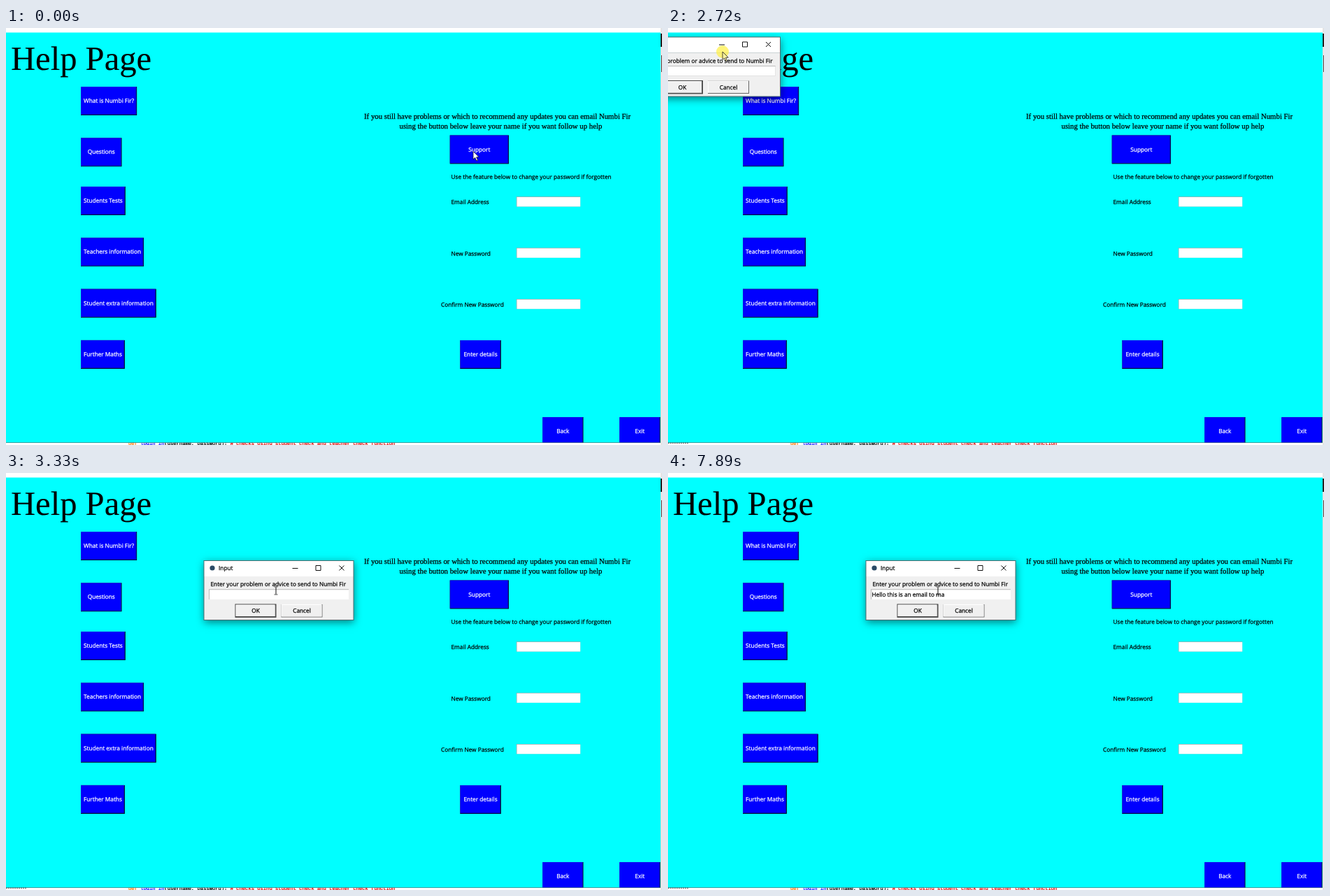
An HTML page with a canvas for the animation above (8 s loop, 938 px wide and 597 px high).

```html
<!DOCTYPE html>
<html lang="en">
<head>
<meta charset="utf-8">
<title>Help Page</title>
<style>
  html, body { margin: 0; width: 100%; height: 100%; overflow: hidden; background: #fff; }
  canvas { display: block; }
</style>
</head>
<body>
<canvas id="stage" width="938" height="597"></canvas>
<script>
const ctx = document.getElementById('stage').getContext('2d');
ctx.textRendering = 'geometricPrecision';
ctx.lineJoin = 'round';

const LOOP = 8000;
const STEP = 80;
const DIALOG_AT = 1930;
const GRAB = 2720, DROP = 3040, IBEAM_AT = 3280;
const TYPING_AT = 3800;
const BRAND = 'Numbi Fir';
const SANS = '8.27px "Open Sans", sans-serif';
const SERIF = '10.79px "Liberation Serif", serif';
const MONO = '7.15px "Liberation Mono", monospace';
const LEFT_LABELS = [`What is ${BRAND}?`, 'Questions', 'Students Tests',
  'Teachers information', 'Student extra information', 'Further Maths'];

// [time, x, y]
const POINTER = [
  [0, 668, 176.5], [480, 652, 171], [800, 732, 182], [960, 701, 177],
  [1200, 686, 178], [1920, 686, 178], [GRAB, 78, 34],
  [2880, 366, 128.5], [DROP, 386, 144], [IBEAM_AT, 386, 168.5]
];
const DIALOG = [[GRAB, -54, 12.5], [2880, 262.5, 109.5], [DROP, 282.5, 125]];

// [word, start, ms per letter]
const WORDS = [
  ['Hello', TYPING_AT, 150], ['this', 4780, 83], ['is', 5330, 80], ['an', 5800, 70],
  ['email', 6270, 130], ['to', 7220, 150], ['ma', 7720, 80]
];

function place(keys, t) {
  const next = keys.findIndex(key => key[0] > t);
  if (next < 0) return keys[keys.length - 1].slice(1);
  if (next === 0) return keys[0].slice(1);
  const [t0, x0, y0] = keys[next - 1], [t1, x1, y1] = keys[next];
  const k = (t - t0) / (t1 - t0);
  return [x0 + (x1 - x0) * k, y0 + (y1 - y0) * k];
}

function typing(t) {
  let typed = '';
  let caret = t < TYPING_AT && (t - 650) % 1000 < 600;
  for (const [word, start, pace] of WORDS) {
    if (t < start) break;
    const count = Math.floor((t - start) / pace) + 1;
    typed += (typed && ' ') + word.slice(0, count);
    caret = count <= word.length;
  }
  return { typed, caret };
}

function box(color, x, y, w, h) {
  ctx.fillStyle = color;
  ctx.fillRect(x, y, w, h);
}

// A hairline outline gives the denser look of screen text.
function text(str, x, y, color = '#000', font = SANS, align = 'left', weight = 0.25) {
  ctx.font = font;
  ctx.fillStyle = ctx.strokeStyle = color;
  ctx.textAlign = align;
  ctx.lineWidth = weight;
  ctx.fillText(str, x, y);
  ctx.strokeText(str, x, y);
}

function path(points, close) {
  ctx.beginPath();
  for (const [x, y] of points) ctx.lineTo(x, y);
  if (close) ctx.closePath();
}

function line(...points) {
  path(points);
  ctx.stroke();
}

function disc(color, x, y, r) {
  ctx.fillStyle = color;
  ctx.beginPath();
  ctx.arc(x, y, r, 0, Math.PI * 2);
  ctx.fill();
}

function blueButton(label, x, y, minWidth = 58.5) {
  ctx.font = SANS;
  const w = Math.max(minWidth, ctx.measureText(label).width + 8), h = 41;
  box('#000', x, y, w, h);
  box('#2626ff', x, y, w - 0.8, h - 0.8);
  box('#000099', x + 0.7, y + 0.7, w - 1.5, h - 1.5);
  box('#00f', x + 0.7, y + 0.7, w - 2.2, h - 2.2);
  text(label, x + w / 2, y + h / 2 + 2.6, '#fff', SANS, 'center');
}

function entry(x, y, w, h) {
  box('#a0a0a0', x, y, w, h);
  box('#fff', x + 0.7, y + 0.7, w - 0.7, h - 0.7);
}

function backdrop(t) {
  box('#fff', 0, 0, 938, 597);
  box('#e4e4e4', 936, 0, 2, 597);
  box('#222', 936, 8, 2, 19);
  box('#444', 937, 39, 1, 24);
  if (t >= DIALOG_AT) for (let x = 0; x < 28; x += 3) box('#777', x, 594, 2, 1);

  let x = 175;
  for (const [part, color] of [
    ['def ', '#ff7700'], ['login_in', '#00f'], ['(username, password): ', '#000'],
    ['# checks using student check and teacher check function', '#d00']
  ]) {
    text(part, x, 597, color, MONO);
    x += ctx.measureText(part).width;
  }
}

function helpPage() {
  ctx.save();
  ctx.beginPath();
  ctx.rect(0, 6.5, 936, 587.5);
  ctx.clip();
  box('#0ff', 0, 0, 936, 597);
  text('Help Page', 7, 60, '#000', '48.6px "Liberation Serif", serif', 'left', 0.1);

  text(`If you still have problems or which to recommend any updates you can email ${BRAND}`, 512, 130, '#000', SERIF);
  text('using the button below leave your name if you want follow up help', 562.5, 143.7, '#000', SERIF);
  text('Use the feature below to change your password if forgotten', 636.5, 215.5);

  ['Email Address', 'New Password', 'Confirm New Password'].forEach((label, i) => {
    const y = 241.4 + i * 73.3;
    text(label, i < 2 ? 636.5 : 622, y + 10.8);
    entry(729.8, y, 91.4, 14.2);
  });

  LEFT_LABELS.forEach((label, i) => blueButton(label, 107, 84 + i * 73.3 - (i > 1 ? 3.6 : 0)));
  blueButton('Support', 634.7, 153.5, 84.3);
  blueButton('Enter details', 649.3, 447);
  blueButton('Back', 767, 557);
  blueButton('Exit', 877, 557);
  box('#4d7777', 0, 593.3, 936, 0.7);
  ctx.restore();
}

function greyButton(label, x, y, w, h) {
  box('#666', x, y, w, h);
  box('#fff', x, y, w - 1, h - 1);
  box('#f0f0f0', x + 1, y + 1, w - 2, h - 2);
  text(label, x + w / 2, y + h / 2 + 2.9, '#000', SANS, 'center');
}

function inputDialog(t, x, y) {
  ctx.save();
  ctx.translate(x, y);
  ctx.save();
  ctx.shadowColor = 'rgba(0,0,0,0.5)';
  ctx.shadowBlur = 11;
  ctx.shadowOffsetY = 3;
  box('#4b6f73', 0, 0, 215, 86);
  ctx.restore();
  box('#fff', 1, 1, 213, 22);
  box('#f0f0f0', 1, 23, 213, 62);

  disc('#2b4a66', 12.5, 11, 3.6);
  text('Input', 21.5, 14.4);
  ctx.strokeStyle = '#111';
  ctx.lineWidth = 1;
  line([127, 11.5], [135, 11.5]);
  ctx.strokeRect(160.5, 7.5, 7, 7);
  line([194, 7.5], [201, 14.5]);
  line([201, 7.5], [194, 14.5]);

  text(`Enter your problem or advice to send to ${BRAND}`, 10, 37);
  entry(7.5, 41.5, 200, 14.5);
  const { typed, caret } = typing(t);
  text(typed, 9, 51.7);
  if (caret) box('#000', 9 + ctx.measureText(typed).width, 43.5, 1.5, 10.5);

  box('#444', 45, 62.5, 59, 19.5);
  greyButton('OK', 46, 63.5, 57, 17.5);
  greyButton('Cancel', 111, 63, 59, 18.5);
  ctx.restore();
}

function pointer(t, x, y) {
  const dragging = t >= GRAB && t < DROP;
  const clicking = t >= 1620 && t < 1770;
  if (dragging || clicking) disc('rgba(255,240,70,0.72)', x, y, 9);
  ctx.save();
  ctx.translate(x, y);
  ctx.strokeStyle = '#111';
  if (t >= IBEAM_AT) {
    ctx.lineWidth = 1;
    line([0, -5], [0, 5]);
    for (const dy of [-5.5, 5.5]) box('#222', -2.5, dy - 0.4, 5, 0.8);
  } else {
    path([[0, 0], [0, 11.5], [2.7, 9.1], [4.7, 13.6], [6.6, 12.7], [4.6, 8.4], [8.2, 8.2]], true);
    ctx.fillStyle = dragging ? '#fbf3a0' : '#fff';
    ctx.fill();
    ctx.lineWidth = 0.75;
    ctx.stroke();
  }
  ctx.restore();
}

function draw(t) {
  const held = Math.floor(t / STEP) * STEP;
  backdrop(t);
  helpPage();
  if (t >= DIALOG_AT) inputDialog(t, ...place(DIALOG, held));
  pointer(t, ...place(POINTER, held));
}

const begin = performance.now();
function tick() {
  draw((performance.now() - begin) % LOOP);
  requestAnimationFrame(tick);
}
tick();
</script>
</body>
</html>
```
